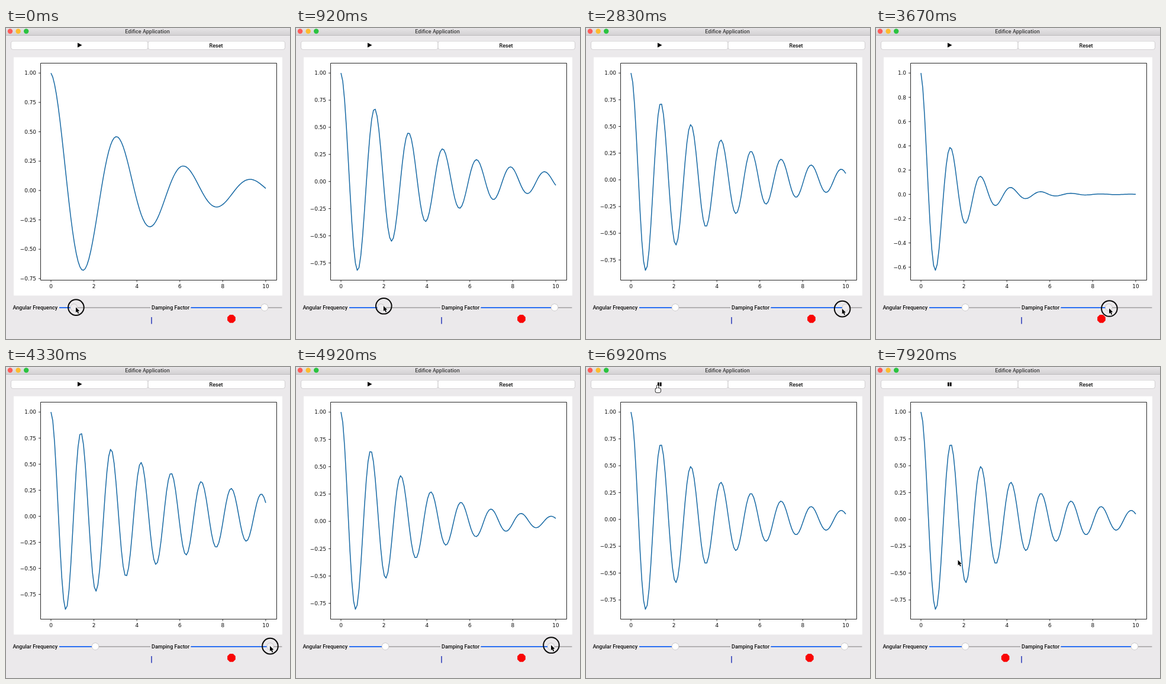
An HTML page with a canvas for the animation above (8000 ms loop, 480 by 526 pixels).

```html
<!DOCTYPE html>
<html lang="en">
<head>
<meta charset="utf-8">
<title>Edifice Application</title>
<style>
  html, body { margin: 0; width: 100%; height: 100%; overflow: hidden; background: #ebe9eb; }
  canvas { display: block; width: 480px; height: 526px; }
</style>
</head>
<body>
<canvas id="stage"></canvas>
<script>
const LOOP = 8000, W = 480, H = 526;
const UI_FONT = '500 9.05px Roboto, sans-serif';
const PLOT_FONT = '8.9px "DejaVu Sans", sans-serif';
const AXES = { left: 58.5, top: 59.5, right: 457.5, bottom: 426.5 };
const SAMPLES = 120;
const TRACK_Y = 473;

// Moments of the session in ms
const FREQUENCY_SET = 1305, FREQUENCY_RELEASE = 1600;
const DAMPING_GRAB = 2250, DAMPING_SET = 5300, DAMPING_RELEASE = 5600;
const CLICK = 6760, PLAY_START = 6882, PLAY_RATE = 0.954;
const KNOB_LAG = 110;

const canvas = document.getElementById('stage');
const ctx = canvas.getContext('2d');
const dpr = window.devicePixelRatio || 1;
canvas.width = W * dpr;
canvas.height = H * dpr;
ctx.scale(dpr, dpr);

const clamp = (v, low, high) => Math.min(high, Math.max(low, v));

function smooth(ms, from, to) {
  const p = clamp((ms - from) / (to - from), 0, 1);
  return p * p * (3 - 2 * p);
}

function pointerAt(ms) {
  const move = (from, to, distance) => distance * smooth(ms, from, to);
  const sway = 2.5 * Math.cos(2 * Math.PI * (ms - 3100) / 4200);
  const toButton = smooth(ms, 5950, 6700);
  const toPlot = smooth(ms, 7450, 7920);
  const x = 118 + move(0, FREQUENCY_SET, 37.8) + move(1750, DAMPING_GRAB, 281.2)
    + move(DAMPING_GRAB, 2450, 9) - move(2450, 3620, 53) + move(3620, 4250, 54)
    - move(4250, 4800, 16) + move(4900, DAMPING_SET, 6)
    - 316 * toButton + 17.5 * toPlot;
  const y = (472.5 + sway) * (1 - toButton) + 31 * toButton + 295.5 * toPlot;
  return { x, y };
}

function frequencyAt(ms) {
  return 2.02 + (pointerAt(Math.min(ms, FREQUENCY_SET)).x - 118) * .0653;
}

function dampingKnobAt(ms) {
  return pointerAt(clamp(ms - KNOB_LAG, DAMPING_GRAB, DAMPING_SET)).x;
}

function rect(x, y, w, h, fill) {
  ctx.fillStyle = fill;
  ctx.fillRect(x, y, w, h);
}

function paint(fill, stroke, width) {
  if (stroke) { ctx.strokeStyle = stroke; ctx.lineWidth = width; ctx.stroke(); }
  if (fill) { ctx.fillStyle = fill; ctx.fill(); }
}

function disc(x, y, r, fill, stroke, width = 1) {
  ctx.beginPath();
  ctx.arc(x, y, r, 0, 2 * Math.PI);
  paint(fill, stroke, width);
}

function box(x, y, w, h, r, fill, stroke, width = 1) {
  ctx.beginPath();
  ctx.roundRect(x, y, w, h, r);
  paint(fill, stroke, width);
}

function polygon(points, fill, stroke, width = 1) {
  ctx.beginPath();
  points.forEach(([x, y]) => ctx.lineTo(x, y));
  ctx.closePath();
  ctx.lineJoin = 'round';
  paint(fill, stroke, width);
}

function line(x1, y1, x2, y2, color, width) {
  ctx.beginPath();
  ctx.moveTo(x1, y1);
  ctx.lineTo(x2, y2);
  paint(null, color, width);
}

function text(str, x, y, font, align = 'left', color = '#0c0c0c') {
  ctx.font = font;
  ctx.textAlign = align;
  ctx.fillStyle = color;
  ctx.fillText(str, x, y);
}

function drawWindow(playing) {
  rect(0, 0, W, H, '#ebe9eb');
  const bar = ctx.createLinearGradient(0, 0, 0, 12);
  bar.addColorStop(0, '#e6e4e6');
  bar.addColorStop(1, '#d3d1d3');
  rect(0, 0, W, 12, bar);
  rect(0, 12, W, 1, '#bdbbbd');
  ['#fc5b57', '#fdbc2e', '#2ac33f'].forEach((color, i) => disc(7 + i * 13.6, 5.5, 4.2, color));
  text('Edifice Application', 239, 9, UI_FONT, 'center', '#3c3c3c');

  for (const x of [9, 240.5]) box(x, 22.5, 230.5, 13.5, 3, '#fff', '#c0bec0', 1.2);
  text('Reset', 355, 32.5, UI_FONT, 'center');
  if (playing) {
    for (const x of [121, 124.8]) rect(x, 26, 2.8, 6.5, '#000');
  } else {
    polygon([[121, 25], [128.5, 29], [121, 33]], '#000');
  }
}

function drawPlot(wave) {
  const { left, top, right, bottom } = AXES;
  rect(13, 49.5, 454, 403, '#fff');

  const points = Array.from({ length: SAMPLES }, (_, i) => {
    const t = 10 * i / (SAMPLES - 1);
    return [t, wave(t)];
  });
  const min = Math.min(...points.map(p => p[1]));
  const margin = .05 * (1 - min);
  const low = min - margin, high = 1 + margin;
  const px = t => 76 + 36.3 * t;
  const py = v => bottom - (v - low) / (high - low) * (bottom - top);

  for (let t = 0; t <= 10; t += 2) {
    line(px(t), bottom, px(t), bottom + 3.2, '#000', .8);
    text(t, px(t), 440.3, PLOT_FONT, 'center');
  }
  const step = (high - low) / 9 <= .2 ? .2 : .25;
  for (let n = Math.ceil(low / step); n * step <= high; n++) {
    const y = py(n * step);
    const label = Math.abs(n * step).toFixed(step === .2 ? 1 : 2);
    line(left - 3.5, y, left, y, '#000', .8);
    text((n < 0 ? '\u2212' : '') + label, 51, y + 3.3, PLOT_FONT, 'right');
  }

  ctx.beginPath();
  points.forEach(([t, v]) => ctx.lineTo(px(t), py(v)));
  ctx.lineJoin = 'round';
  paint(null, '#1769a4', 1.5);

  ctx.strokeStyle = '#111';
  ctx.lineWidth = .9;
  ctx.strokeRect(left, top, right - left, bottom - top);
}

function drawSlider(label, labelX, start, knobX, pressed) {
  const end = start + 154;
  text(label, labelX, 476, UI_FONT);
  line(start, TRACK_Y, end, TRACK_Y, '#b3b1b3', 2);
  line(start, TRACK_Y, knobX, TRACK_Y, '#2c70f2', 2);
  disc(knobX, TRACK_Y - .5, 5.5, pressed ? '#efedef' : '#fff', '#c2c0c2', 1.4);
}

function drawOscillator(position) {
  line(246, 489, 246, 500.5, '#2434b8', 1.5);
  const x = 246 + 135 * position, y = 491.8;
  const corners = Array.from({ length: 8 }, (_, i) => {
    const angle = (i + .5) * Math.PI / 4;
    return [x + 7.4 * Math.cos(angle), y + 7.4 * Math.sin(angle)];
  });
  polygon(corners, '#f90606');
}

function drawHand() {
  box(-1.4, 0, 2.8, 9, 1.4, '#fff', '#000', 1.6);
  box(-3.5, 5, 8.5, 7, 2.5, '#fff', '#000', 1.6);
  rect(-.6, 3, 1.2, 4, '#fff');
}

function drawArrow() {
  polygon([[0, 0], [0, 9], [2, 7.2], [3.6, 10.8], [5.2, 10.1], [3.7, 6.6], [6.4, 6.4]],
    '#000', '#fff', 1.2);
}

function drawPointer({ x, y }, pressed) {
  if (pressed) disc(x + .4, y + .3, 13.3, null, '#0a0a0a', 2);
  ctx.save();
  ctx.translate(x, y);
  if (y < 37) drawHand(); else drawArrow();
  ctx.restore();
}

function render(ms) {
  const frequency = frequencyAt(ms);
  const knob = dampingKnobAt(ms);
  const damping = .253 + .0099 * (437 - knob);
  const wave = t => Math.exp(-damping * t) * Math.cos(frequency * t);

  const tuning = ms < FREQUENCY_RELEASE;
  const braking = ms >= DAMPING_GRAB && ms < DAMPING_RELEASE;
  const clicking = ms >= CLICK && ms < PLAY_START;
  const elapsed = Math.max(0, ms - PLAY_START) / 1000 * PLAY_RATE;

  drawWindow(elapsed > 0);
  drawPlot(wave);
  drawSlider('Angular Frequency', 11.5, 90, 85 + 14.7 * frequency, tuning);
  drawSlider('Damping Factor', 246, 312.5, knob, braking);
  drawOscillator(wave(elapsed));
  drawPointer(pointerAt(ms), tuning || braking || clicking);
}

const began = performance.now();
function tick() {
  render((performance.now() - began) % LOOP);
  requestAnimationFrame(tick);
}
tick();
</script>
</body>
</html>
```
